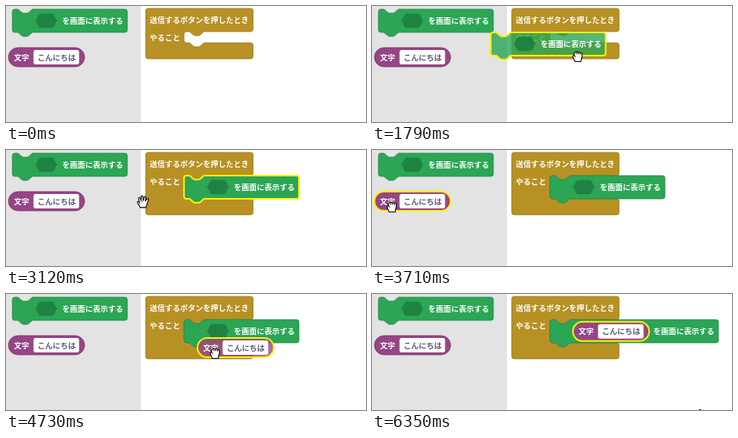
An HTML page with a canvas that plays this animation: 451x145 px, repeating every 6800 ms.

```html
<!DOCTYPE html>
<html lang="ja">
<head>
<meta charset="utf-8">
<style>
html, body { margin: 0; width: 100%; height: 100%; overflow: hidden; background: #fff; }
canvas { display: block; }
</style>
</head>
<body>
<canvas id="stage" width="451" height="145"></canvas>
<script>
const ctx = document.getElementById('stage').getContext('2d');
const LOOP = 6800;
const YELLOW = '#fff000';
const GREEN = { fill: '#2aa655', edge: '#228746', hole: '#1f8142' };
const BROWN = { fill: '#b89125', edge: '#98771c' };
const PURPLE = { fill: '#964684', edge: '#7a376b' };

// Bursts of movement: start, end, number of steps
const BURSTS = [[300, 1040, 6], [1340, 2380, 8], [2680, 3710, 8],
                [3860, 4880, 8], [5030, 5170, 2], [5770, 6350, 5]];

// Pointer path: time, x, y
const POINTER = [
  [0, 132, 160], [150, 132, 160], [300, 131, 144], [600, 126, 95], [890, 117, 34],
  [1040, 117, 34], [1340, 158, 50], [1640, 225, 62], [1930, 290, 64], [2230, 324, 58],
  [2380, 324, 58], [2680, 310, 58], [2980, 230, 62], [3270, 110, 68], [3570, 25, 71],
  [3710, 25, 71], [3860, 60, 75], [4010, 135, 84], [4160, 205, 87], [4300, 242, 83],
  [4590, 262, 74], [4880, 270, 67], [5030, 271, 61], [5170, 271, 61], [5620, 271, 61],
  [5770, 285, 70], [6350, 412, 152], [LOOP, 412, 152]
];

const NOTCH = 'l4 3.5q1.5 1.5 3 1.5h4q1.5 0 3 -1.5l4 -3.5';
const NOTCH_BACK = 'l-4 3.5q-1.5 1.5 -3 1.5h-4q-1.5 0 -3 -1.5l-4 -3.5';
const HOLE = new Path2D('M28 14.2c4-1 3-8.7 8-8.7h13c5 0 4 7.7 8 8.7c-4 1-3 9-8 9h-13c-5 0-4-8-8-9z');
const OPEN_HAND = new Path2D('M-3.5 7C-4 5-6.5 2.5-7 .5C-7.3-1-5.5-1.2-4.5.5L-5.5-4C-5.8-6-3.8-6.3-3.3-4.5' +
  'L-2.4-2L-2.2-6.3C-2.2-8 0-8 0-6.3L.2-2L1.6-5.8C2.1-7.4 4-6.8 3.6-5.2L3-1.5L5-3.5' +
  'C6-4.6 7.3-3.5 6.7-2.2C5.5 0 5 4 3.5 7Z');
const FIST = new Path2D('M-3.5 6.5C-4 4.5-6 3-6 0C-6-1.5-4.5-1.5-4-1C-5-3-5-5-3-5Q-1.5-6.5 0-5' +
  'Q2-6.2 3-4.5Q5.5-5 5.5-2C5.5 2 4.5 3 4 6.5Z');
const KNUCKLES = new Path2D('M-1.7-4.5v1.8M.7-4.7v2M3-4v1.6');

function stepTime(t) {
  let held = 0;
  for (const [start, end, count] of BURSTS) {
    if (t < start) break;
    const gap = (end - start) / (count - 1);
    held = start + Math.min(count - 1, Math.floor((t - start) / gap + 0.02)) * gap;
  }
  return held;
}

function pointerAt(t) {
  const i = POINTER.findIndex(key => key[0] > t);
  const [t0, x0, y0] = POINTER[i - 1], [t1, x1, y1] = POINTER[i];
  const u = (t - t0) / (t1 - t0);
  return { x: x0 + (x1 - x0) * u, y: y0 + (y1 - y0) * u };
}

function at(x, y, draw) {
  ctx.save();
  ctx.translate(x, y);
  draw();
  ctx.restore();
}

function label(text, x, middle, color = '#fff') {
  ctx.fillStyle = color;
  ctx.fillText(text, x, middle + 3.6);
}

function body(path, color, { selected, dragged } = {}) {
  ctx.globalAlpha = dragged ? 0.8 : 1;
  ctx.fillStyle = color.fill;
  ctx.fill(path);
  ctx.globalAlpha = 1;
  ctx.lineWidth = selected ? 2 : 0.8;
  ctx.strokeStyle = selected ? YELLOW : color.edge;
  ctx.stroke(path);
}

function showBlock(x, y, state = {}) {
  const extra = state.filled ? 67 : 0, w = 144 + extra;
  at(x, y, () => {
    body(new Path2D(`M0 3Q0 0 3 0H7${NOTCH}H${w - 3}q3 0 3 3v23q0 3-3 3H25${NOTCH_BACK}H3q-3 0-3-3z`), GREEN, state);
    if (!state.filled) {
      ctx.fillStyle = GREEN.hole;
      ctx.fill(HOLE);
      if (state.target) {
        ctx.lineWidth = 3;
        ctx.strokeStyle = YELLOW;
        ctx.stroke(HOLE);
      }
    }
    label('を画面に表示する', 62.5 + extra, 14.2);
  });
}

function textBlock(x, y, state) {
  at(x, y, () => {
    const pill = new Path2D();
    pill.roundRect(0, 0, 95.5, 24, 12);
    body(pill, PURPLE, state);
    ctx.fillStyle = '#fff';
    ctx.beginPath();
    ctx.roundRect(31.5, 3, 57, 18, 2.5);
    ctx.fill();
    label('文字', 7, 12);
    label('こんにちは', 36.5, 12, '#575e75');
  });
}

function eventBlock(mouth) {
  at(175, 3, () => {
    body(new Path2D(`M0 3Q0 0 3 0H131.5q3 0 3 3v23q0 3-3 3H73${NOTCH_BACK}H51q-3 0-3 3v${mouth - 6}q0 3 3 3H55` +
      `${NOTCH}H131.5q3 0 3 3v14q0 3-3 3H3q-3 0-3-3z`), BROWN);
    label('送信するボタンを押したとき', 5, 14.5);
    label('やること', 5, 36.5);
  });
}

function hand(x, y, closed, deleting) {
  at(x, y, () => {
    const shape = closed ? FIST : OPEN_HAND;
    ctx.fillStyle = '#fff';
    ctx.strokeStyle = '#000';
    ctx.lineWidth = 1.1;
    ctx.fill(shape);
    ctx.stroke(shape);
    if (closed) ctx.stroke(KNUCKLES);
    if (deleting) {
      ctx.strokeStyle = '#e8281e';
      ctx.lineWidth = 2;
      ctx.stroke(new Path2D('M1.5 2l6.5 6.5m0-6.5l-6.5 6.5'));
    }
  });
}

function render(now) {
  const t = Math.round(stepTime(now % LOOP));
  const within = (from, to) => t >= from && t < to;
  const p = pointerAt(t);
  const showDragged = within(1340, 2380), textDragged = within(3860, 5170);
  const joined = t >= 5170;

  ctx.fillStyle = '#fff';
  ctx.fillRect(0, 0, 451, 145);
  ctx.fillStyle = '#e3e3e3';
  ctx.fillRect(0, 0, 169, 145);
  ctx.font = 'bold 9.55px "Noto Sans CJK JP", "Noto Sans CJK", sans-serif';

  showBlock(8, 4, { selected: within(1040, 1340) });
  textBlock(3, 52, { selected: within(3710, 3860) });
  eventBlock(t >= 2380 ? 29 : 14);

  if (t >= 2380) showBlock(223, 32, { selected: t < 3710, filled: joined, target: within(4880, 5170) });
  if (showDragged) showBlock(p.x - 109, p.y - 30, { selected: true, dragged: true });
  if (textDragged) textBlock(p.x - 22, p.y - 19, { selected: true, dragged: true });
  if (joined) textBlock(251.7, 34.7, { selected: true });

  const closed = within(1040, 2380) || within(3710, 5170);
  hand(p.x, p.y, closed, (showDragged || textDragged) && p.x < 169);
}

const began = performance.now();
function tick() {
  render(performance.now() - began);
  requestAnimationFrame(tick);
}
tick();
</script>
</body>
</html>
```
